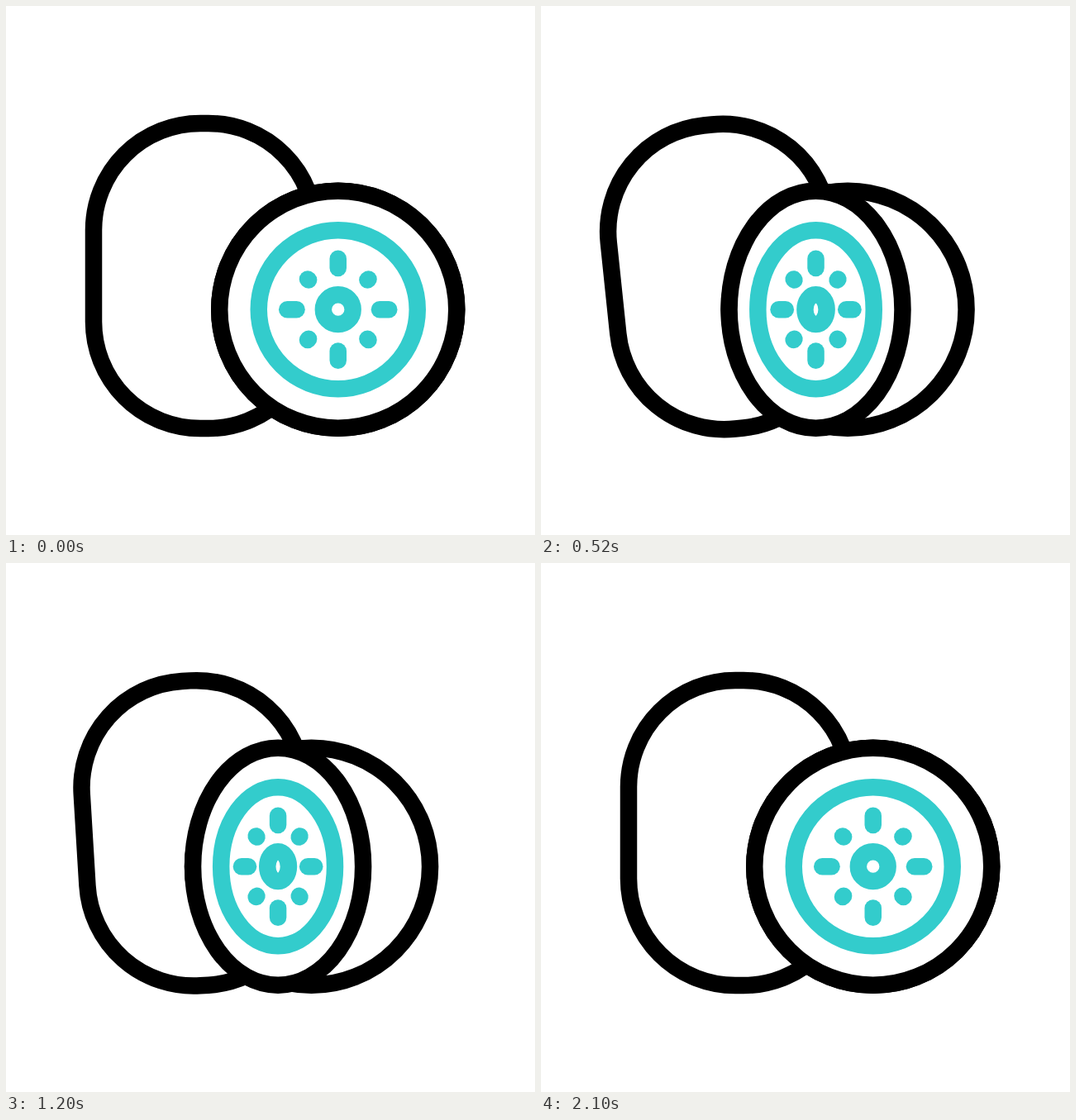
These frames come from a looping animation (640 by 640 pixels, 2.32 s). An HTML page:

```html
<!DOCTYPE html>
<html lang="en">
<head>
<meta charset="utf-8">
<title>Kiwi</title>
<style>
  html, body { margin: 0; width: 100%; height: 100%; overflow: hidden; background: #fff; }
  svg { display: block; width: 100vw; height: 100vh; }
</style>
</head>
<body>
<svg viewBox="0 0 640 640" fill="#fff" stroke="#000" stroke-width="20.5" stroke-linecap="round">
  <rect id="body" x="106" y="142" width="268" height="369" rx="129"/>
  <circle id="ball" cy="367.2" r="143.5"/>
  <g id="face"></g>
</svg>
<script>
const LOOP = 2320;
const CENTER = { x: 401.75, y: 367.2 };
const RADIUS = 143.5;
const TEAL = "#33cccc";
const SLIDE = 32.2;    // how far the back half moves left
const SQUEEZE = 0.282; // how much narrower the cut face gets

const SWAY = [[0, 0], [420, -8], [840, 6], [1260, -4], [1680, 2], [2100, 0]];
const TURN = [[0, 0], [600, 1], [1200, 1], [1800, 0]];

const body = document.getElementById("body");
const ball = document.getElementById("ball");
const face = document.getElementById("face");

function add(tag, attrs) {
  const node = document.createElementNS("http://www.w3.org/2000/svg", tag);
  for (const key in attrs) node.setAttribute(key, attrs[key]);
  return face.appendChild(node);
}

const rings = [[RADIUS, "#000"], [96, TEAL], [17.9, TEAL]].map(([r, stroke]) => ({
  r, node: add("ellipse", { cy: CENTER.y, ry: r, stroke })
}));

// Long seeds on the axes, almost round ones on the diagonals.
const seeds = Array.from({ length: 8 }, (_, i) => {
  const angle = i * Math.PI / 4;
  const [near, far] = i % 2 ? [50.4, 52] : [50.2, 61.5];
  const dx = Math.cos(angle), dy = Math.sin(angle);
  const node = add("line", {
    stroke: TEAL,
    y1: CENTER.y + near * dy,
    y2: CENTER.y + far * dy
  });
  return { node, x1: near * dx, x2: far * dx };
});

function valueAt(keys, t) {
  const next = keys.findIndex(key => key[0] > t);
  if (next < 0) return keys[keys.length - 1][1];
  const [t0, a] = keys[next - 1], [t1, b] = keys[next];
  const u = (t - t0) / (t1 - t0);
  return a + (b - a) * u * u * (3 - 2 * u);
}

function render(t) {
  body.setAttribute("transform", `rotate(${valueAt(SWAY, t)} 240 511)`);

  const turn = valueAt(TURN, t);
  const scale = 1 - SQUEEZE * turn;
  const ballX = CENTER.x - SLIDE * turn;
  const faceX = ballX - RADIUS * (1 - scale); // left edges stay together
  ball.setAttribute("cx", ballX);
  for (const { node, r } of rings) {
    node.setAttribute("cx", faceX);
    node.setAttribute("rx", r * scale);
  }
  for (const { node, x1, x2 } of seeds) {
    node.setAttribute("x1", faceX + x1 * scale);
    node.setAttribute("x2", faceX + x2 * scale);
  }
}

const start = performance.now();
function tick() {
  render((performance.now() - start) % LOOP);
  requestAnimationFrame(tick);
}
tick();
</script>
</body>
</html>
```
